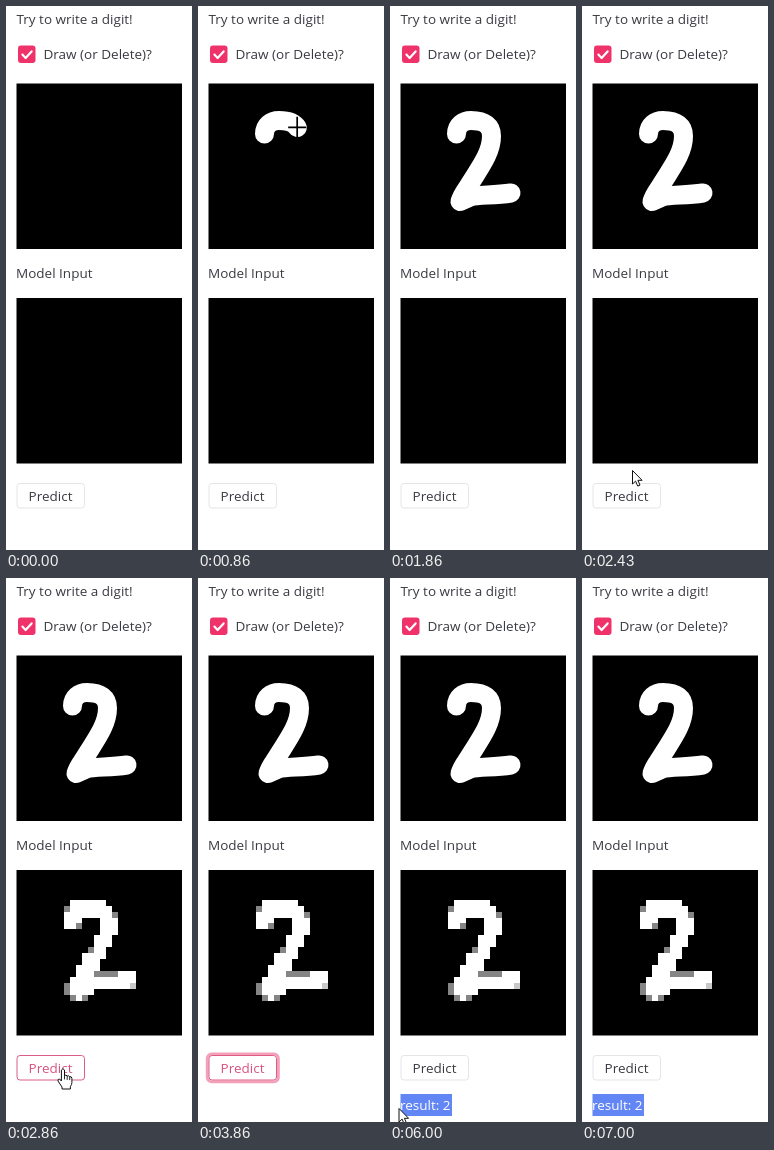
An HTML page that plays this animation: 186 px wide and 544 px high, repeating every 7140 ms.

```html
<!DOCTYPE html>
<html lang="en">
<head>
<meta charset="utf-8">
<title>Digit predictor</title>
<style>
  html, body { margin: 0; width: 100%; height: 100%; overflow: hidden; background: #fff; }
  svg { display: block; width: 186px; height: 544px; }
  text { font: 13.5px "Open Sans", "Noto Sans", sans-serif; fill: #3a3b42; white-space: pre; }
  .pink { fill: #f0326a; }
  .line { fill: none; stroke-linecap: round; stroke-linejoin: round; }
  #button rect { fill: #fff; stroke: #e4e5e9; }
  #button.hot rect { stroke: #dc5c86; }
  #button.hot text { fill: #d9527f; }
  #button #ring { fill: none; stroke: #f4a0b9; stroke-width: 2.8; visibility: hidden; }
  #button.focus #ring { visibility: visible; }
  #cursors > g { visibility: hidden; }
</style>
</head>
<body>
<svg viewBox="0 0 186 544">
  <defs>
    <clipPath id="marked"><rect class="mark" y="516" height="22"/></clipPath>
  </defs>

  <text x="10.5" y="18">Try to write a digit!</text>
  <rect class="pink" x="12" y="39.5" width="17.5" height="17.5" rx="3"/>
  <path class="line" d="M16.4 48.6l3.2 3.4 6-6.6" stroke="#fff" stroke-width="2.2"/>
  <text x="37.5" y="53">Draw (or Delete)?</text>

  <rect x="10.5" y="77.5" width="165.5" height="165.5"/>
  <path id="ink" class="line" stroke="#fff" stroke-width="19"
    d="M66.5 128C66.5 119 73 114.5 81 114.5C95 114.5 101.5 120 101.5 130C101.5 146 91 160 81 176C77 183 72 188 70 195.5L79 191.5C86 188 102 190 121 187"/>

  <text x="10" y="272">Model Input</text>
  <rect x="10.5" y="292" width="165.5" height="165.5"/>
  <g id="model" transform="translate(10.9 292) scale(5.94)" shape-rendering="crispEdges">
    <path fill="#858585" d="M8 6h1v1h-1zM16 7h1v1h-1zM10 9h1v1h-1zM12 13h1v1h-1zM13 17h4v1h-4zM8 19h1v2h-1zM9 21h3v1h-3z"/>
    <path fill="#fff" d="M9 5h6v1h1v2h1v3h-1v2h-1v2h-1v2h-1v1h4v-1h3v3h-7v1h-2v1h-1v-1h-1v-3h1v-2h1v-2h2v-3h1v-3h-3v1h-1v1h-2v-3h1z"/>
    <path fill="#c8c8c8" d="M19 19h1v1h-1z"/>
  </g>

  <g id="button">
    <rect id="ring" x="9.2" y="475.8" width="71.2" height="28" rx="4.5"/>
    <rect x="11" y="477.5" width="67.5" height="24.5" rx="3"/>
    <text x="22.6" y="495">Predict</text>
  </g>

  <g id="result">
    <text x="10" y="532">result: 2</text>
    <rect class="mark" y="516" height="22" fill="#6286f4"/>
    <text x="10" y="532" clip-path="url(#marked)" style="fill:#fff">result: 2</text>
  </g>

  <g id="cursors">
    <g id="cross"><path d="M-9 0H9M0-10.5V10.5" stroke="#000" stroke-width="1.7"/></g>
    <g id="arrow"><path d="M.5.5V14l3.1-2.9 2.1 5 2.3-1-2.1-4.8h4.2z" fill="#fff" stroke="#111" stroke-linejoin="round"/></g>
    <g id="beam"><path class="line" d="M-2.5-7.5q2.5 0 2.5 1.5V6q0 1.5-2.5 1.5M2.5-7.5q-2.5 0-2.5 1.5V6q0 1.5 2.5 1.5" stroke="#111"/></g>
    <g id="hand">
      <path d="M-1.6 1.5Q0-1 1.5 1.5V7q1.5-1 2.7.5 1.5-.8 2.5.7 2-.4 2.2 1.7V14q0 2-1.5 4v2.5H-1V18.5L-5 12.5Q-5.5 10.5-3.5 10.5L-1.6 12.5z" fill="#fff" stroke="#111" stroke-linejoin="round"/>
      <path class="line" d="M1.5 7v3.5M4.2 8v3M6.7 8.5v2.7" stroke="#111" stroke-width=".9"/>
    </g>
  </g>
</svg>
<script>
const LOOP = 7140;
const $ = id => document.getElementById(id);
const ink = $("ink"), inkLength = ink.getTotalLength();

// time, share of the stroke drawn
const strokes = [
  [0, 0], [570, .03], [710, .12], [860, .24], [1000, .36],
  [1140, .49], [1290, .63], [1430, .747], [1570, 1]
];

// time, cursor, x, y; a cursor without a place follows the pen
const moves = [
  [0], [570, "cross"], [1710, "cross", 119, 194], [1860, "cross", 110, 225],
  [2000, "arrow", 94, 262], [2140, "arrow", 76, 325], [2290, "arrow", 59, 405],
  [2430, "arrow", 50, 464], [2570, "hand", 55, 486], [2710, "hand", 57, 489],
  [2860, "hand", 57, 490.5], [3860],
  [5140, "arrow", 88, 533], [5290, "beam", 64, 528], [5570, "beam", 53, 528],
  [5710, "beam", 39, 529], [5860, "beam", 21, 530], [6000, "arrow", 8.5, 530],
  [6140, "arrow", 5, 530], [6290, "arrow", 4, 530], [6570, "arrow", 22, 534], [6710]
];

// time, left edge of the selection
const marks = [[0, 62], [5570, 53], [5710, 39], [5860, 21], [6000, 10.5]];

const at = (table, t) => table.findLast(row => row[0] <= t);
const show = (id, on) => $(id).style.visibility = on ? "visible" : "hidden";

function render(t) {
  const drawn = at(strokes, t)[1] * inkLength;
  ink.style.strokeDasharray = `${drawn} 999`;
  show("ink", drawn > 0);
  show("model", t >= 2570);
  show("result", t >= 4430);

  const button = $("button").classList;
  button.toggle("hot", t >= 2570 && t < 5570);
  button.toggle("focus", t >= 3430 && t < 5570);

  const left = at(marks, t)[1];
  for (const rect of document.querySelectorAll(".mark")) {
    rect.setAttribute("x", left);
    rect.setAttribute("width", 62 - left);
  }

  const tip = ink.getPointAtLength(drawn);
  const [, kind, x = tip.x, y = tip.y] = at(moves, t);
  for (const cursor of $("cursors").children) {
    show(cursor.id, cursor.id === kind);
    cursor.setAttribute("transform", `translate(${x} ${y})`);
  }
}

const start = performance.now();
function tick() {
  render((performance.now() - start) % LOOP);
  requestAnimationFrame(tick);
}
tick();
</script>
</body>
</html>
```
